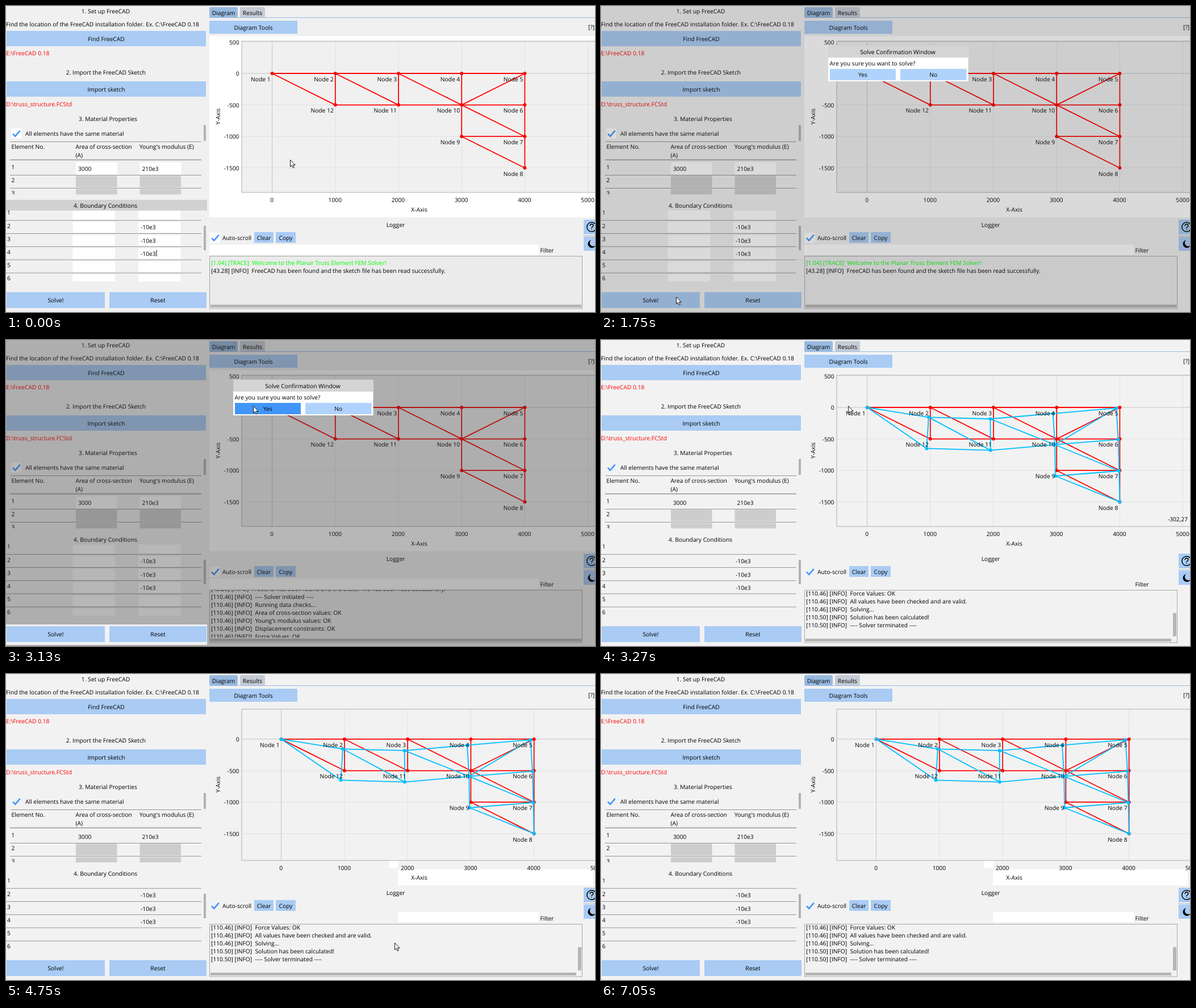
Recreate the animation shown at these times as an HTML page. Size 1037 by 540 pixels, loop 7600 ms.

```html
<!DOCTYPE html>
<html lang="en">
<head>
<meta charset="utf-8">
<title>Truss solver</title>
<style>
  html, body { margin: 0; width: 100%; height: 100%; overflow: hidden; background: #f0f0f0; }
  svg { display: block; width: 1037px; height: 540px; }
  text { font: 10.28px "Open Sans", "Noto Sans", sans-serif; white-space: pre; text-rendering: geometricPrecision; }
</style>
</head>
<body>
<svg id="stage" viewBox="0 0 1037 540" xmlns="http://www.w3.org/2000/svg"></svg>
<script>
const LOOP = 7600;
const SOLVED = 3270;
const BLUE = '#a9cbf4';
const stage = document.getElementById('stage');

// time, x, y of the pointer tip
const pointer = [
  [0, 500, 271], [420, 455, 305], [550, 385, 348], [670, 323, 380],
  [810, 285, 412], [930, 230, 460], [1060, 170, 498], [1180, 136, 508], [1320, 132, 513],
  [2020, 300, 320], [2140, 425, 171], [2290, 414, 140], [2420, 404, 120], [2570, 419, 109],
  [2720, 430, 113], [2850, 435, 116], [3540, 540, 185], [3670, 620, 205], [3790, 673.7, 202.7],
  [4320, 690, 313], [4470, 697, 400], [4600, 693, 462], [4750, 684, 474],
  [6330, 734, 485], [6490, 860, 509], [6640, 930, 514], [6770, 993, 518], [6920, 1014, 530], [7050, 1050, 560]
];
const zoomTimes = [3540, 3670, 3790, 3910, 4050];
const steps = [...new Set([
  ...pointer.map(p => p[0]), ...zoomTimes,
  1600, 1750, 1870, 3000, 3130, SOLVED, 4200, 4900, 5030, 5460
])].sort((a, b) => a - b);

const nodes = [
  [0, 0], [1000, 0], [2000, 0], [3000, 0], [4000, 0], [4000, -500],
  [4000, -1000], [4000, -1500], [3000, -1000], [3000, -500], [2000, -500], [1000, -500]
];
const deformed = [
  [0, 0], [973, -156], [1950, -182], [2942, -97], [3945, -11], [3975, -509],
  [3989, -1007], [4000, -1498], [2979, -1088], [2972, -591], [1954, -680], [943, -651]
];
const members = ('1-2 2-3 3-4 4-5 1-12 2-12 2-11 3-11 3-10 4-10 5-10 12-11 11-10 ' +
  '10-6 5-6 6-7 10-7 10-9 9-7 9-8 7-8').split(' ').map(m => m.split('-').map(n => n - 1));

const logLines = [
  '[1.04] [TRACE]  Welcome to the Planar Truss Element FEM Solver!',
  '[43.28] [INFO]  FreeCAD has been found and the sketch file has been read successfully.',
  ...['---- Solver initiated ----', 'Running data checks...', 'Area of cross-section values: OK',
    "Young's modulus values: OK", 'Displacement constraints: OK', 'Force Values: OK',
    'All values have been checked and are valid.', 'Solving...'].map(s => '[110.46] [INFO]  ' + s),
  ...['Solution has been calculated!', '---- Solver terminated ----'].map(s => '[110.50] [INFO]  ' + s)
];

// x, y are the left (or anchor) edge and the vertical middle of the capitals
const text = (x, y, s, anchor = 'start', fill = '#000') =>
  `<text x="${x}" y="${y + 3.7}" text-anchor="${anchor}" fill="${fill}">${s}</text>`;
const mid = (x, y, s) => text(x, y, s, 'middle');
const box = (x1, y1, x2, y2, fill, extra = '') =>
  `<rect x="${x1}" y="${y1}" width="${x2 - x1}" height="${y2 - y1}" fill="${fill}" ${extra}/>`;
const line = (x1, y1, x2, y2, color, w = 1) =>
  `<path d="M${x1} ${y1}L${x2} ${y2}" stroke="${color}" stroke-width="${w}"/>`;
const button = (x1, y1, x2, y2, label, fill = BLUE) =>
  box(x1, y1, x2, y2, fill) + mid((x1 + x2) / 2, (y1 + y2) / 2 + .3, label);
const clip = (id, x1, y1, x2, y2, body) =>
  `<clipPath id="${id}">${box(x1, y1, x2, y2, '#000')}</clipPath><g clip-path="url(#${id})">${body}</g>`;
const check = (x, y, field) => box(x, y, x + 18, y + 18, field) +
  `<path d="M${x + 3} ${y + 9.5}l4.3 4.3l8.5 -10" fill="none" stroke="#4296fa" stroke-width="2.6"/>`;

function leftPanel(t, field) {
  const pressed = t >= 1600 && t < 1750;
  let out = mid(175.5, 9, '1. Set up FreeCAD') +
    text(0, 32, 'Find the location of the FreeCAD installation folder. Ex. C:\\FreeCAD 0.18') +
    button(1, 44, 352, 71, 'Find FreeCAD') +
    text(0, 83.5, 'E:\\FreeCAD 0.18', 'start', '#f00') +
    mid(176, 117.5, '2. Import the FreeCAD Sketch') +
    button(1, 133, 352, 160, 'Import sketch') +
    text(0, 173.5, 'D:\\truss_structure.FCStd', 'start', '#f00') +
    mid(179.5, 199, '3. Material Properties') +
    check(9, 216, field) + text(34, 225.5, 'All elements have the same material') +
    box(348, 210, 352, 238, '#b2b2b2') +
    line(8, 239.5, 344, 239.5, '#949494') + line(7, 271.5, 344, 271.5, '#949494', 1.4) +
    text(9.5, 248.5, 'Element No.') + text(122.5, 248.5, 'Area of cross-section') +
    text(122.5, 263, '(A)') + text(235, 248.5, "Young's modulus (E)");

  let table = line(7, 298.5, 344, 298.5, '#949494') + line(7, 321.5, 344, 321.5, '#949494');
  for (const [x, value] of [[123, '3000'], [235.5, '210e3']]) {
    table += box(x, 276, x + 72.5, 298, field) + text(x + 4, 287.5, value) +
      box(x, 299.5, x + 72.5, 320, '#cdcdcd') + box(x, 323, x + 72.5, 333, '#cdcdcd');
  }
  table += text(9.5, 284.5, '1') + text(9.5, 307.5, '2') + text(9.5, 330, '3');
  out += clip('materials', 0, 270, 356, 332.5, table);

  if (t < 1600) out += box(0, 342, 354, 361, '#d1d1d1');
  out += mid(175, 352, '4. Boundary Conditions');
  let rows = '';
  for (let i = 0; i < 6; i++) {
    const y = 357.8 + 23.2 * i;
    rows += text(2, y + 6.8, i + 1);
    if (i < 5) rows += line(0, y + 20.5, 344, y + 20.5, '#949494');
    rows += box(117.5, y, 192, y + 19, field) + box(233, y, 307.5, y + 19, field);
    if (i > 0 && i < 4) rows += text(237, y + 9.6, '-10e3');
  }
  if (t < 1600) rows += line(265, 431, 265, 442, '#000');
  out += clip('bounds', 0, 361, 356, 486, rows) + box(348, 388, 352, 431, '#b2b2b2');
  return out + button(1, 505, 174, 533, 'Solve!', pressed ? '#0f87fa' : BLUE) +
    button(182, 505, 353, 533, 'Reset');
}

function viewAt(t) {
  if (t < 4200) {
    const p = zoomTimes.filter(z => z <= t).length / zoomTimes.length;
    const k = 1.21 ** p, q = (k - 1) / .21;
    return { x: 468.6 - 23.7 * q, y: 119 - 22.5 * q, s: .1112 * k };
  }
  const k = t < 4320 ? 1.1 : 1.21;
  return { x: 673.7 - 228.8 / k, y: 202.7 - 106.2 / k, s: .13463 / k };
}

function truss(points, color, view) {
  const at = ([x, y]) => [view.x + x * view.s, view.y - y * view.s];
  return members.map(([a, b]) => line(...at(points[a]), ...at(points[b]), color, 1.8)).join('') +
    points.map(p => { const [x, y] = at(p); return `<circle cx="${x}" cy="${y}" r="3" fill="${color}"/>`; }).join('');
}

function plot(t, tip) {
  const view = viewAt(t), fine = view.s > .131;
  const solved = t >= SOLVED;
  let out = solved ? '' : box(358, 53, 1037, 373, '#fff') + box(415, 62, 1037, 329, '#f0f0f0');
  if (t >= 4200) out += box(674, 329, 690, 342, '#fff');
  if (t >= 4470) out += box(690, 345, 1033, 373, '#fff') + box(690, 420, 938, 438, '#fff');

  let labels = '', grid = '';
  const xStep = fine ? 500 : 1000, yStep = fine ? 200 : 500;
  for (let u = 0; u <= 5000; u += xStep) {
    const x = view.x + u * view.s;
    grid += line(x, 62, x, 329, u ? '#e0e0e0' : '#c4c4c4');
    labels += mid(x - .5, 342, u);
  }
  for (let u = -2000; u <= 500; u += yStep) {
    const y = view.y - u * view.s;
    if (y < 62 || y > 329) continue;
    grid += line(415, y, 1037, y, u ? '#e0e0e0' : '#c4c4c4');
    labels += text(410.5, y + .5, u, 'end');
  }
  let body = grid + truss(nodes, '#f00', view);
  if (solved) body += truss(deformed, '#00bfff', view);
  nodes.forEach(([x, y], i) => {
    const right = Math.max(view.x + x * view.s - 3, 450.5);
    body += text(right, view.y - y * view.s + 10, 'Node ' + (i + 1), 'end');
  });
  if (solved && t < 4470) {
    const x = Math.round((tip[0] - view.x) / view.s), y = Math.round((view.y - tip[1]) / view.s);
    body += text(1033, 316, x + ',' + y, 'end');
  }
  return out + clip('plot', 415, 62, 1037, 329, body) + labels +
    `<path d="M1038 62H415V329H1038" fill="none" stroke="#aeaeae"/>` +
    mid(727.5, 359.5, 'X-Axis') + `<g transform="translate(373.5 195) rotate(-90)">${mid(0, 0, 'Y-Axis')}</g>`;
}

function logger(t, field) {
  const solved = t >= SOLVED, started = t >= 3130;
  const scroll = !started ? 0 : !solved ? 28 : t < 4900 || t >= 5460 ? 104 : t < 5030 ? 46 : 0;
  const lines = logLines.slice(0, started ? 12 : 2).map((s, i) =>
    text(361, 453 + 14 * i - scroll, s, 'start', i ? '#000' : '#0f0')).join('');
  let out = mid(686, 386, 'Logger') + check(359, 400, field) + text(381, 409, 'Auto-scroll') +
    button(437, 399, 471, 418, 'Clear') + button(475, 399, 510, 418, 'Copy') +
    box(358, 421, 938, 439, field) + text(940.5, 431, 'Filter') +
    box(358.5, 441.5, 1014.5, 534, solved ? 'none' : '#ebebeb', 'stroke="#a6a6a6"') +
    clip('log', 359, 442, 1006, 525, lines) +
    box(360, 527, solved ? 1004 : 1013, 532, '#b5b5b5');
  if (solved) {
    const y = 443 + 39 * scroll / 104;
    out += box(1007, y, 1013, y + 41, '#b5b5b5');
  }
  return out;
}

function rightPanel(t, field, tip) {
  return box(358, 2, 408, 20, '#98badf', 'rx="2"') + mid(383, 12, 'Diagram') +
    box(412, 2, 456, 20, '#c6ccd6', 'rx="2"') + mid(434, 12, 'Results') +
    line(358, 20.5, 1037, 20.5, '#98badf') +
    button(358, 26, 513, 49, 'Diagram Tools') + text(1025, 37.5, '[?]') +
    plot(t, tip) + logger(t, field) +
    box(1017, 377, 1037, 403, BLUE) + line(1016, 405.5, 1037, 405.5, '#b4b4b4') +
    box(1017, 407, 1037, 432, BLUE) +
    '<circle cx="1031" cy="390" r="8.2" fill="none" stroke="#000" stroke-width="1.5"/>' +
    '<path d="M1028.3 388q0 -3 2.8 -3t2.8 2.6q0 1.500 -1.500 2.300t-1.400 2.100m0 1.300v1.300" fill="none" stroke="#000" stroke-width="1.500"/>' +
    '<path d="M1030 413a7 7 0 1 0 8 9.500a6 6 0 0 1 -8 -9.500z"/>';
}

function dialog(t) {
  const yes = t < 2720 ? '#b0d3fd' : t >= 3000 && t < 3130 ? '#0f87fa' : '#4296fa';
  let out = box(0, 0, 1037, 540, '#333', `opacity="${t < 1870 ? .18 : .35}"`);
  if (t >= 3130) {
    out += box(0, 502, 354, 538, '#f2f2f2') +
      button(1, 505, 174, 533, 'Solve!') + button(182, 505, 353, 533, 'Reset');
  }
  return out + box(400, 70, 646.5, 133, '#fff') + box(400, 70, 646.5, 91, '#d4d4d4') +
    mid(522.5, 81, 'Solve Confirmation Window') + text(402.5, 101.5, 'Are you sure you want to solve?') +
    button(403, 111, 519, 131, 'Yes', yes) + button(527, 111, 643.5, 131, 'No', '#b0d3fd');
}

function scene(t) {
  const [, ...tip] = pointer.filter(p => p[0] <= t).pop();
  const solved = t >= SOLVED, field = solved ? 'none' : '#fff';
  let out = box(0, 0, 1037, 540, solved ? '#f2f2f2' : '#f0f0f0') +
    leftPanel(t, field) + rightPanel(t, field, tip);
  if (t >= 1600 && t < 1750) {
    out += box(151, 514, 290.5, 532, '#fff', 'stroke="#b0b0b0"') + text(153.5, 524, 'Load a FreeCAD sketch first.');
  }
  if (t >= 1750 && !solved) out += dialog(t);
  return out + `<path transform="translate(${tip[0] + .5} ${tip[1] + .5})"
    d="M0 0V12.300L2.800 9.700L4.800 14.300L6.800 13.400L4.900 9H8.700Z" fill="#fff" stroke="#000" stroke-width=".9"/>`;
}

let shown = -1;
function update() {
  const now = performance.now() % LOOP;
  const step = steps.filter(s => s <= now).pop();
  if (step !== shown) {
    shown = step;
    stage.innerHTML = scene(step);
  }
  requestAnimationFrame(update);
}
update();
</script>
</body>
</html>
```
